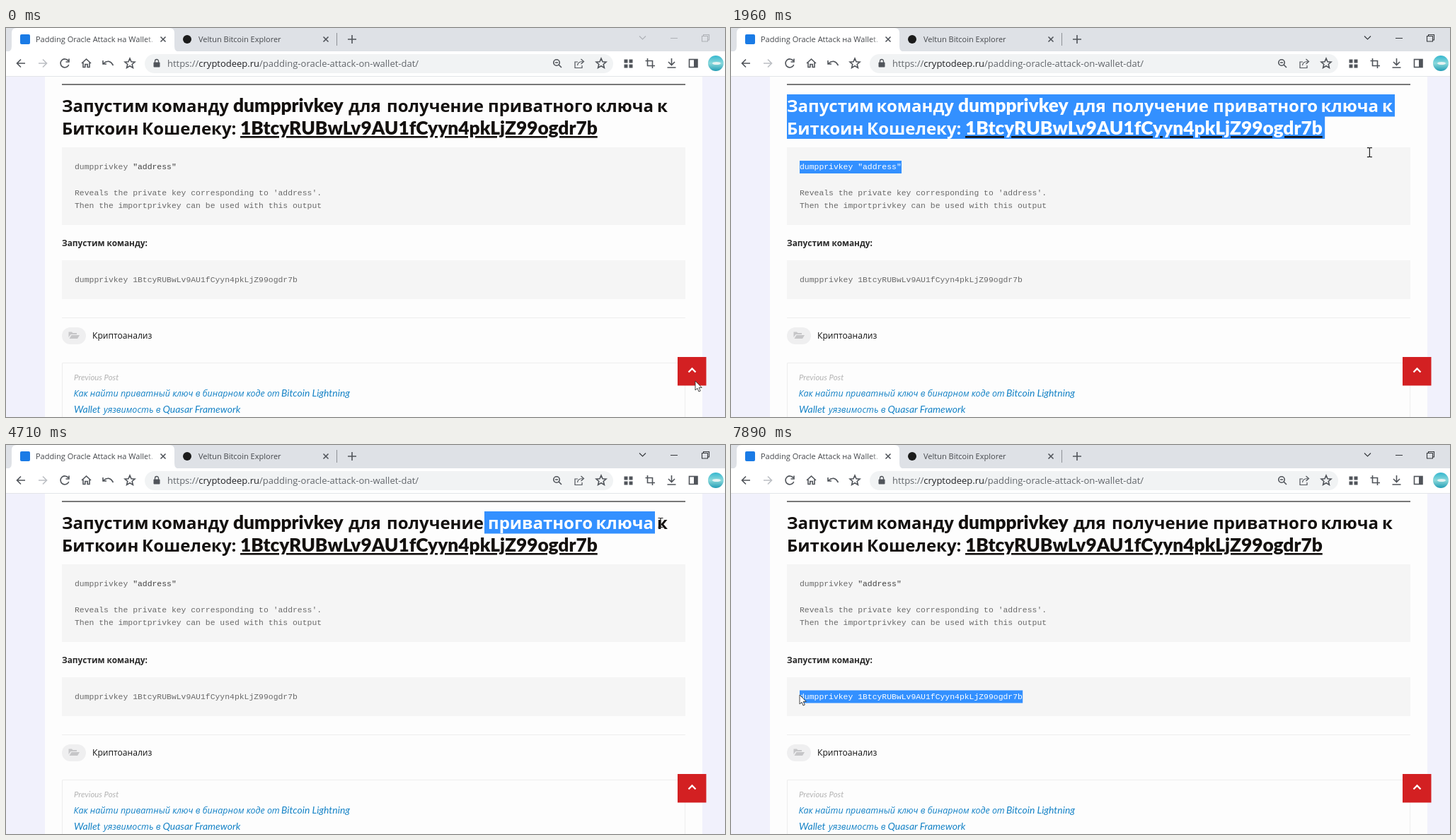
Animation of 1016 by 551 pixels, one loop 8000 ms. Source, as an HTML page:

```html
<!DOCTYPE html>
<html lang="ru">
<head>
<meta charset="utf-8">
<title>Page selection</title>
<style>
html, body { margin: 0; width: 100%; height: 100%; overflow: hidden; background: #fff; }
svg { display: block; width: 1016px; height: 551px; }
text { white-space: pre; }
.ui { font-family: "Open Sans", "Noto Sans", sans-serif; }
.tab { font-size: 11px; fill: #45484c; }
.h { font: 700 24px "Open Sans", "Noto Sans", sans-serif; fill: var(--ink); }
.hl { font: 900 26.25px Lato, sans-serif; }
.address { fill: #14110f; text-decoration: underline; }
.address tspan { fill: var(--ink); }
.code { font: 11.42px "Liberation Mono", monospace; fill: var(--mono); }
.str { fill: var(--str); }
.link { font: italic 12.5px "Open Sans", "Noto Sans", sans-serif; fill: #1482c6; }
.lato { font: italic 13.95px Lato, sans-serif; }
.note { font: italic 11.4px Lato, sans-serif; fill: #b4b4b4; }
.plain { --ink: #14110f; --mono: #6a6a6a; --str: #404040; }
.picked { --ink: #fff; --mono: #fff; --str: #fff; }
.line { fill: none; stroke: #50545a; stroke-width: 1.6; }
.solid { fill: #50545a; }
</style>
</head>
<body>
<svg viewBox="0 0 1016 551" xmlns="http://www.w3.org/2000/svg">
  <defs>
    <linearGradient id="fade"><stop stop-color="#fff" stop-opacity="0"/><stop offset="1" stop-color="#fff"/></linearGradient>
    <linearGradient id="photo" x2="0" y2="1"><stop stop-color="#35b7cf"/><stop offset=".5" stop-color="#8bd9dc"/><stop offset="1" stop-color="#239db4"/></linearGradient>
    <path id="star" d="M0-7 2-2.2 7-1.8 3.2 1.5 4.4 6.4 0 3.8-4.4 6.4-3.2 1.5-7-1.8-2-2.2Z"/>
    <path id="cross" d="M-3.5-3.5 3.5 3.5M3.5-3.5-3.5 3.5"/>
    <g id="copy">
      <g class="h">
        <text x="79" y="119">Запустим</text><text x="205.5" y="119">команду</text>
        <text class="hl" x="321" y="119">dumpprivkey</text>
        <text x="484" y="119">для</text><text x="538" y="119">получение</text>
        <text x="681" y="119">приватного</text><text x="833.5" y="119">ключа</text><text x="920" y="119">к</text>
        <text x="79" y="151">Биткоин</text><text x="192" y="151">Кошелеку:</text>
        <text class="hl address" x="331" y="151"><tspan>1BtcyRUBwLv9AU1fCyyn4pkLjZ99ogdr7b</tspan></text>
      </g>
      <g class="code">
        <text x="97" y="200">dumpprivkey <tspan class="str">"address"</tspan></text>
        <text x="97" y="237">Reveals the private key corresponding to 'address'.</text>
        <text x="97" y="255">Then the importprivkey can be used with this output</text>
        <text x="97" y="360">dumpprivkey 1BtcyRUBwLv9AU1fCyyn4pkLjZ99ogdr7b</text>
      </g>
    </g>
    <clipPath id="picked">
      <use href="#s0"/><use href="#s1"/><use href="#s2"/><use href="#s3"/>
    </clipPath>
  </defs>

  <!-- tabs -->
  <rect width="1016" height="34" fill="#dee1e6"/>
  <path d="M0 34Q8 34 8 26V7Q8 0 15 0H231Q238 0 238 7V26Q238 34 246 34Z" fill="#fff"/>
  <rect x="20" y="9" width="14" height="14" rx="2" fill="#1a7be6"/>
  <circle cx="256" cy="16" r="6" fill="#1b1b1b"/>
  <g class="ui tab">
    <text x="42" y="20">Padding Oracle Attack на Wallet.</text>
    <text x="272" y="20">Veltun Bitcoin Explorer</text>
  </g>
  <rect x="198" y="6" width="14" height="20" fill="url(#fade)"/>
  <g class="line">
    <use href="#cross" x="222" y="16"/><use href="#cross" x="452" y="16"/>
    <path d="M483 16H495M489 10V22"/>
  </g>
  <path d="M467.5 7V25" stroke="#8d9196"/>
  <path id="windowKeys" fill="none" stroke-width="1.1" d="M895 11.5 899.5 16 904 11.5M939 14.5H949M983.5 11.5H991.5V19H983.5ZM985.5 11.5V9.5H993.5V17H991.5"/>

  <!-- toolbar -->
  <rect y="33" width="1016" height="36" fill="#fff"/>
  <rect x="196" y="37" width="662" height="27" rx="13.5" fill="#f1f3f4"/>
  <g class="line">
    <path d="M27 50H16M21 44.5 15.5 50 21 55.5"/>
    <path d="M46 50H57M52 44.5 57.5 50 52 55.5" stroke="#bcbfc4"/>
    <path d="M88 46.5A6 6 0 1 0 88.7 52M89 43.5V48H84.5"/>
    <path d="M107 50 113.5 44 120 50M109 49V55.5H111.8V51.5H115.2V55.5H118V49"/>
    <path d="M137 46V51H142M137.5 50.5Q146 43 151.5 53"/>
    <use href="#star" x="175" y="50"/><use href="#star" x="841" y="50"/>
    <circle cx="778" cy="49" r="4.2"/><path d="M781 52 785 56M776 49H780"/>
    <path d="M808 48H804V56.5H814V53M807.5 53Q808 47.5 815 47.5M812.5 44 816.5 47.5 812.5 51" stroke-width="1.2"/>
    <path d="M906.5 43V53.5H917M903.5 46.5H913.5V57"/>
    <path d="M940.5 43V52M936 48 940.5 52.5 945 48M934.5 56H946.5"/>
    <rect x="965.5" y="44.5" width="11.5" height="11"/>
    <path d="M210.5 49V47A2.5 2.5 0 0 1 215.5 47V49" stroke-width="1.3"/>
  </g>
  <g class="solid">
    <rect x="208.5" y="48.5" width="9" height="7" rx="1"/>
    <path d="M873.5 44.5h5v5h-5zM880.5 44.5h5v5h-5zM873.5 51.5h5v5h-5zM880.5 51.5h5v5h-5zM972 44.5h5v11h-5z"/>
  </g>
  <circle cx="1003" cy="50" r="11" fill="url(#photo)"/>
  <ellipse cx="1004" cy="50" rx="6" ry="2" fill="#e6f3f2"/>
  <text class="ui" x="228" y="55" font-size="13" fill="#62666b">https://<tspan fill="#202124">cryptodeep.ru</tspan>/padding-oracle-attack-on-wallet-dat/</text>

  <!-- page -->
  <rect y="68" width="1016" height="483" fill="#f1f1fc"/>
  <rect x="55" y="68" width="929" height="483" fill="#fdfdfd"/>
  <path d="M0 68.5H1016" stroke="#e3e5e9"/>
  <path d="M79 80H960" stroke="#777" stroke-width="2"/>
  <path d="M79 169H960V279H79ZM79 329H960V384H79Z" fill="#f5f5f5"/>
  <path d="M79 410.5H960M79.5 551V474.5H959.5V551" fill="none" stroke="#eee"/>
  <text class="ui" x="79" y="309" font-size="11.85" font-weight="700" fill="#2a2a2a">Запустим команду:</text>
  <rect x="79" y="424" width="34" height="24" rx="12" fill="#efeff0"/>
  <path d="M88.5 438V430.5H93L94.5 432H100V434H91.5ZM89.5 440 92.5 435H104L101 440Z" fill="#c6c6c8"/>
  <text class="ui" x="122" y="440" font-size="12.1" fill="#111">Криптоанализ</text>
  <text class="note" x="96" y="499">Previous Post</text>
  <g class="link">
    <text x="95.5" y="522">Как найти приватный ключ в бинарном коде от</text>
    <text class="lato" x="389" y="522">Bitcoin Lightning</text>
    <text class="lato" x="96" y="545">Wallet</text>
    <text x="138" y="545">уязвимость в</text>
    <text class="lato" x="221.5" y="545">Quasar Framework</text>
  </g>
  <rect x="949" y="466" width="40.5" height="40.5" fill="#d32022"/>
  <path d="M964.5 487.5 969.5 482.5 974.5 487.5" fill="none" stroke="#fff" stroke-width="2.3"/>

  <use href="#copy" class="plain"/>
  <g fill="#3390ff">
    <rect id="s0" y="94" height="31.5"/><rect id="s1" y="125" height="32"/>
    <rect id="s2" y="188" height="18"/><rect id="s3" y="347.5" height="18"/>
  </g>
  <g clip-path="url(#picked)"><use href="#copy" class="picked"/></g>

  <g id="pointer">
    <path id="arrow" d="M0 0V13L3 10.3 5 15 7.3 14 5.2 9.4H9.3Z" fill="#fff" stroke="#333" stroke-width=".9"/>
    <path id="beam" d="M-3.5-6.5H-1Q0-6.5 0-5.5Q0-6.5 1-6.5H3.5M0-5.5V5.5M-3.5 6.5H-1Q0 6.5 0 5.5Q0 6.5 1 6.5H3.5" fill="none" stroke="#222" stroke-width="1.2"/>
  </g>
</svg>
<script>
const LOOP = 8000, LAG = 80, CHAR = 6.852;
const $ = id => document.getElementById(id);
const bars = [0, 1, 2, 3].map(i => $("s" + i));

// pointer path: time, x, y
const path = [
  [0, 974, 500], [140, 974, 500], [920, 86, 109], [960, 86, 109], [1100, 83, 108],
  [1250, 83, 108], [1500, 326, 143], [1800, 760, 165], [2030, 924, 178], [2070, 924, 178],
  [2170, 905, 154], [2640, 905, 154], [2960, 885, 118], [3140, 885, 118], [3750, 683, 112],
  [3890, 677, 110], [4100, 677, 110], [4570, 925, 110], [4710, 925, 110], [4960, 944, 124],
  [5500, 944, 124], [5960, 531, 293], [6140, 431, 320], [6280, 431, 320], [6650, 416, 362],
  [6750, 416, 362], [7070, 206, 364], [7210, 166, 363], [7600, 100, 356], [7890, 97, 354], [8000, 97, 354]
];

const slope = (i, k) => (path[i + 1][k] - path[i][k]) / (path[i + 1][0] - path[i][0]);

function tangent(i, k) {
  if (i === 0 || i === path.length - 1) return 0;
  const a = slope(i - 1, k), b = slope(i, k);
  return a * b > 0 ? 2 * a * b / (a + b) : 0;
}

// monotone cubic through the path points
function pointerAt(t) {
  let i = 0;
  while (i < path.length - 2 && t >= path[i + 1][0]) i++;
  const span = path[i + 1][0] - path[i][0], u = (t - path[i][0]) / span;
  const rise = u * u * (3 - 2 * u), start = u * (1 - u) * (1 - u), end = u * u * (u - 1);
  const value = k => path[i][k] + (path[i + 1][k] - path[i][k]) * rise
    + span * (start * tangent(i, k) + end * tangent(i + 1, k));
  return { x: value(1), y: value(2) };
}

// selected [left, right] for heading lines 1 and 2, code line, command line
function selectionAt(t) {
  if (t >= 1250 && t < 3180) {
    const p = pointerAt(Math.min(t, 2400) - LAG);
    if (p.y < 125) return [[79, p.x]];
    return [[79, 938], [79, Math.min(841, p.x)], p.y > 163 ? [97, 241] : null];
  }
  if (t >= 4100 && t < 6720) {
    const { x } = pointerAt(Math.min(t, 5100) - LAG);
    return [[676, x > 930 ? 933 : Math.min(917, x)]];
  }
  if (t >= 6750) {
    const chars = Math.round((pointerAt(t - LAG).x - 97) / CHAR);
    return [null, null, null, [97 + Math.max(0, chars) * CHAR, 412.2]];
  }
  return [];
}

function overText(t, { x, y }) {
  const dragging = t > 1250 && t < 2170;
  return dragging || (y > 94 && y < 157 && x > 78) || (y > 346 && y < 368 && x > 98 && x < 420);
}

function draw(t) {
  const p = pointerAt(t), beam = overText(t, p), selection = selectionAt(t);
  $("pointer").setAttribute("transform", `translate(${p.x.toFixed(1)} ${p.y.toFixed(1)})`);
  $("beam").style.display = beam ? "" : "none";
  $("arrow").style.display = beam ? "none" : "";
  $("windowKeys").setAttribute("stroke", t < 1250 ? "#aeb1b6" : "#35383c");
  bars.forEach((bar, i) => {
    const [left, right] = selection[i] || [0, 0];
    bar.setAttribute("x", left);
    bar.setAttribute("width", Math.max(0, right - left));
  });
}

const begin = performance.now();
function tick() {
  draw((performance.now() - begin) % LOOP);
  requestAnimationFrame(tick);
}
tick();
</script>
</body>
</html>
```
